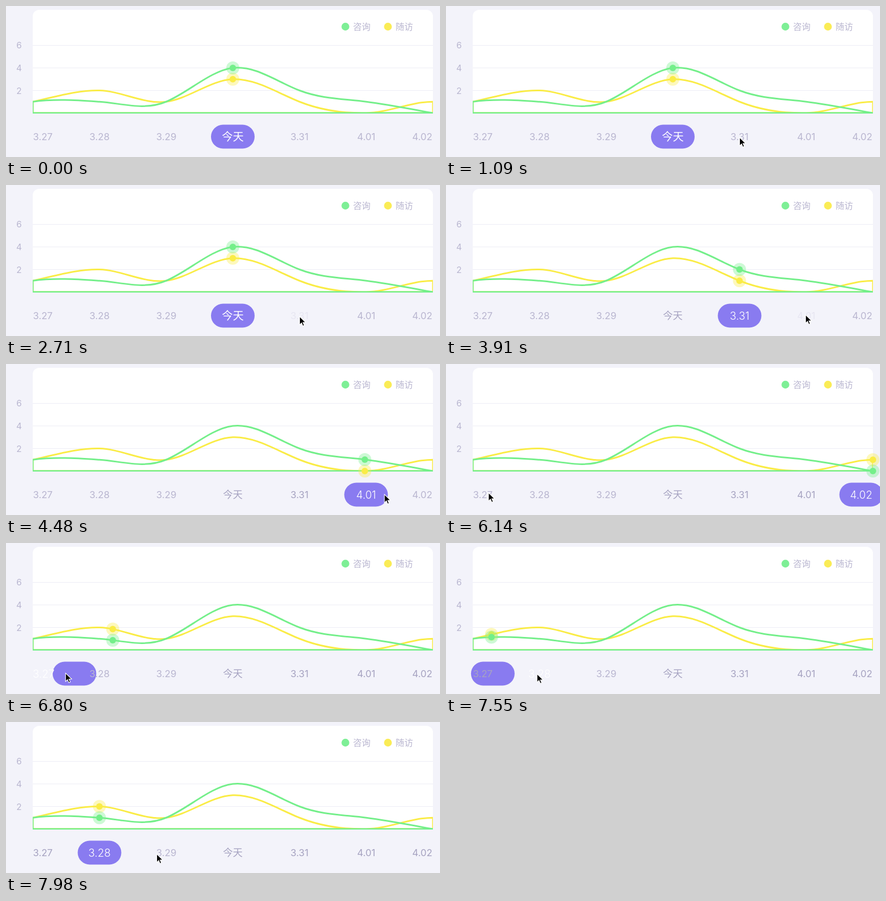
An HTML page that plays this animation: 796x278 px, repeating every 8000 ms.

```html
<!DOCTYPE html>
<html lang="zh">
<head>
<meta charset="utf-8">
<style>
  html, body { margin: 0; width: 100%; height: 100%; overflow: hidden; background: #f3f3fa; }
  svg { display: block; width: 796px; height: 278px; }
  text { font-family: Inter, "Noto Sans CJK SC", "Noto Sans CJK", sans-serif; fill: #b9b6d0; }
  .day { text-anchor: middle; font-size: 17.5px; }
  .day.cjk { font-size: 18px; }
  .day.seen { fill: #a6a3c1; }
  .day.press { fill-opacity: .2; }
  .day.on { fill: #fff; font-size: 19.6px; font-weight: 300; }
  .day.cjk.on { font-size: 20px; }
  .axis { font-size: 16px; text-anchor: middle; }
  .key { font-size: 16px; }
  .grid { stroke: #ececf5; }
  .curve { fill: none; stroke-width: 3; stroke-linejoin: round; }
</style>
</head>
<body>
<svg id="stage" viewBox="0 0 796 278">
  <clipPath id="plot"><rect x="49" y="7" width="734" height="191"/></clipPath>
  <path d="M49 197.5V19a12 12 0 0 1 12-12H771a12 12 0 0 1 12 12V197.5z" fill="#fff"/>
  <path class="grid" d="M49 72.5H783M49 114H783M49 155.5H783"/>
  <text class="axis" x="24" y="78">6</text>
  <text class="axis" x="24" y="120">4</text>
  <text class="axis" x="24" y="161.5">2</text>
  <circle cx="622.5" cy="38" r="7.2" fill="#7eef96"/>
  <text class="key" x="636.5" y="44">咨询</text>
  <circle cx="700.5" cy="38" r="7.2" fill="#faec56"/>
  <text class="key" x="714.5" y="44">随访</text>
  <g id="curves" clip-path="url(#plot)"></g>
  <g id="dots"></g>
  <rect id="pill" y="218.5" width="80" height="44" rx="22" fill="#897bf0"/>
  <g id="days"></g>
  <path id="cursor" d="M0 0V15.4L3.6 12L6 17.6L8.6 16.5L6.2 11H11.2Z" fill="#000" stroke="#fff" stroke-width="1.1"/>
</svg>
<script>
const LOOP = 8000, SLIDE = 430, LEFT = 49, STEP = 734 / 6, BASE = 197, UNIT = 20.75;
const $ = id => document.getElementById(id);

function add(parent, tag, attrs) {
  const el = document.createElementNS("http://www.w3.org/2000/svg", tag);
  for (const k in attrs) el.setAttribute(k, attrs[k]);
  return parent.appendChild(el);
}

// value and slope (px per step) at each day
const series = [
  { color: "#faec46", v: [1, 2, 1, 3, 1, 0, 1], m: [-26, 3, -15, -5, 49, -2, 0] },
  { color: "#74ef8a", v: [1, 1, 1, 4, 2, 1, 0], m: [-17, 8, -51, -15, 47, 16, 22] }
];

for (const s of series) {
  s.y = s.v.map(v => BASE - v * UNIT);
  let d = `M${LEFT} ${BASE}V${s.y[0]}`;
  for (let i = 0; i < 6; i++) {
    const x = LEFT + i * STEP;
    d += `C${x + STEP / 3} ${s.y[i] + s.m[i] / 3} ${x + STEP * 2 / 3} ${s.y[i + 1] - s.m[i + 1] / 3} ${x + STEP} ${s.y[i + 1]}`;
  }
  add($("curves"), "path", { class: "curve", stroke: s.color, d: d + `V${BASE}Z` });
  s.dot = add($("dots"), "g", { fill: s.color });
  add(s.dot, "circle", { r: 12, opacity: .36 });
  add(s.dot, "circle", { r: 6 });
}

function heightAt(s, pos) {
  const i = Math.min(5, Math.floor(pos)), t = pos - i, u = 1 - t;
  return s.y[i] * u * u * (1 + 2 * t) + s.m[i] * t * u * u
    + s.y[i + 1] * t * t * (3 - 2 * t) - s.m[i + 1] * t * t * u;
}

// text, centre at rest, centre when selected
const days = [
  ["3.27", 67.5, 69], ["3.28", 171.5, 171.5], ["3.29", 294, 294], ["今天", 416, 416],
  ["3.31", 538.3, 538.5], ["4.01", 660.7, 660.5], ["4.02", 763.5, 761.5]
].map(([text, rest, picked], i) => {
  const el = add($("days"), "text", {});
  el.textContent = text;
  return { el, rest, picked, cjk: i === 3 };
});

// press time, release time, day
const taps = [[2710, 2750, 4], [3895, 4060, 5], [4990, 5115, 6], [6400, 6457, 0], [7400, 7430, 1]];

// time, x, y of the pointer tip
const path = [
  [390, 611, 275], [620, 575, 260], [860, 547, 247], [1090, 538.5, 242], [3180, 538.5, 242],
  [3340, 590, 242], [3500, 641.5, 242], [3530, 643, 242], [3910, 659.5, 239], [4360, 659.5, 239],
  [4600, 728, 241], [4810, 767.5, 243], [5150, 767.5, 243], [5270, 744.5, 242], [5430, 600, 240],
  [5620, 330, 238], [5790, 163, 237], [5960, 100, 236], [6140, 78, 237], [6330, 71, 239.5],
  [6660, 71, 240], [6800, 109, 239.5], [6960, 150, 240], [7130, 167, 241], [7620, 167, 241],
  [7800, 232, 242.5], [7980, 276.5, 243]
];

// cubic ease-in-out with control points (.42, 0) and (.58, 1)
function ease(x) {
  let a = 0, b = 1;
  for (let i = 0; i < 20; i++) {
    const s = (a + b) / 2, u = 1 - s;
    if (1.26 * s * u * u + 1.74 * s * s * u + s * s * s < x) a = s; else b = s;
  }
  return a * a * (3 - 2 * a);
}

const mix = (a, b, t) => a + (b - a) * t;

function movePointer(t) {
  const c = $("cursor");
  c.style.display = t < path[0][0] ? "none" : "";
  let i = 0;
  while (i < path.length - 2 && t >= path[i + 1][0]) i++;
  const [t0, x0, y0] = path[i], [t1, x1, y1] = path[i + 1];
  const p = Math.max(0, Math.min(1, (t - t0) / (t1 - t0)));
  c.setAttribute("transform", `translate(${mix(x0, x1, p)} ${mix(y0, y1, p)})`);
}

function draw(t) {
  let from = 3, to = 3, p = 1, pressed = -1;
  const seen = new Set();
  for (const [down, up, day] of taps) {
    if (t >= up) {
      seen.add(to);
      from = to;
      to = day;
      p = Math.min(1, (t - up) / SLIDE);
    } else if (t >= down) pressed = day;
  }
  $("pill").setAttribute("x", mix(days[from].picked, days[to].picked, ease(p)) - 40);
  const pos = mix(from, to, p);
  for (const s of series)
    s.dot.setAttribute("transform", `translate(${LEFT + pos * STEP} ${heightAt(s, pos)})`);
  days.forEach((d, i) => {
    const on = i === to;
    d.el.setAttribute("class", "day" + (d.cjk ? " cjk" : "") + (on ? " on" : seen.has(i) ? " seen" : "")
      + (i === pressed ? " press" : ""));
    d.el.setAttribute("x", on ? d.picked : d.rest);
    d.el.setAttribute("y", (on ? 247.6 : 247) + (d.cjk ? .4 : 0));
  });
  movePointer(t);
}

function tick() {
  draw(performance.now() % LOOP);
  requestAnimationFrame(tick);
}
tick();
</script>
</body>
</html>
```
